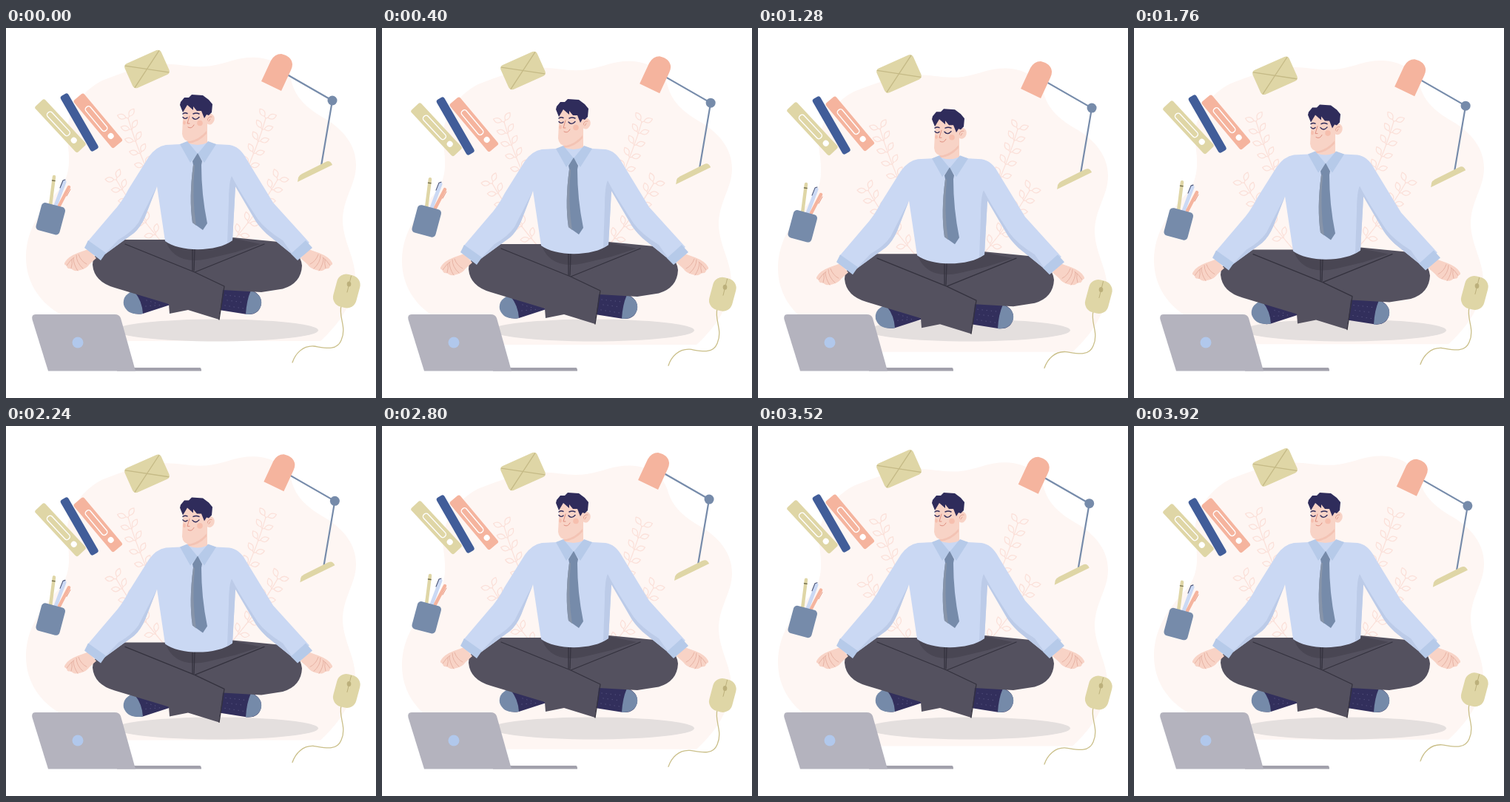
An HTML page for the animation above (4000 ms loop, 500 px wide and 500 px high).

```html
<!DOCTYPE html>
<html lang="en">
<head>
<meta charset="utf-8">
<title>Office meditation</title>
<style>
html, body { margin: 0; width: 100%; height: 100%; overflow: hidden; background: #fff; }
svg { display: block; width: 100vw; height: 100vh; }
.line { fill: none; stroke-linecap: round; stroke-linejoin: round; }
</style>
</head>
<body>
<svg viewBox="0 0 500 500" xmlns="http://www.w3.org/2000/svg">
  <defs>
    <g id="hand">
      <path fill="#f8d3c6" d="M111 299L97 304Q84 309 80 316Q77 320 82 321Q82 326 88 325Q92 330 101 327Q109 325 113 319L122 311Z"/>
      <path class="line" stroke="#e3aa9b" stroke-width=".8" d="M82 321Q87 313 92 310M88 325Q90 318 89 313M97 328Q91 319 91 311M104 325Q95 317 95 307M109 319Q101 315 98 306"/>
    </g>
    <g id="label" class="line" stroke="#fff" stroke-width="1.4">
      <rect x="-24" y="-4" width="41" height="8" rx="3.5"/>
      <circle cx="27" r="4" fill="#fff" stroke="none"/>
    </g>
  </defs>

  <path id="blob" fill="#fef6f3" d="M473 185C473 212 455 230 455 261C456 290 472 310 472 338C470 372 450 400 425 423H150C118 413 95 396 72 386C45 370 27 343 27 310C27 270 50 242 74 216C91 192 84 165 82 143C83 112 103 85 130 71C156 61 184 50 208 49C232 47 252 55 278 51C301 47 316 38 340 40C363 42 380 54 386 73C392 96 409 110 432 123C458 139 473 160 473 185Z"/>
  <g id="plants" class="line" stroke="#fbe0d9" stroke-width="1.2"></g>
  <ellipse cx="285" cy="408.5" rx="137" ry="15" fill="#e4dfde"/>

  <g id="mail">
    <g transform="translate(190.5 55.5) rotate(-24)">
      <rect x="-27" y="-18" width="54" height="36" rx="5" fill="#dfd6a6"/>
      <path class="line" stroke="#c5ba86" stroke-width="1.3" d="M-25-16L25 16M-25 16L25-16"/>
    </g>
  </g>

  <g id="binders">
    <g transform="translate(73.3 132) rotate(47)">
      <rect x="-42" y="-9" width="84.5" height="18" rx="3" fill="#dfd6a6"/><use href="#label"/>
    </g>
    <g transform="translate(124.3 125.3) rotate(50)">
      <rect x="-42" y="-9" width="84" height="18" rx="3" fill="#f5b49e"/><use href="#label"/>
    </g>
    <rect x="-43" y="-6" width="86" height="12" rx="3.5" fill="#415d99" transform="translate(99.2 127.5) rotate(60)"/>
  </g>

  <g id="cup">
    <path class="line" stroke="#dfd6a6" stroke-width="4.5" d="M60 240L65 201"/>
    <path class="line" stroke="#75704f" stroke-width="1.5" d="M62.5 206L66 206.5"/>
    <path class="line" stroke="#cbd9f4" stroke-width="5" d="M67 240L79 208"/>
    <path class="line" stroke="#4a5478" stroke-width="1.1" d="M73 216L77 206L80 205"/>
    <path class="line" stroke="#f5b49e" stroke-width="4.5" d="M72 240L85 215"/>
    <path class="line" stroke="#e69780" stroke-width="1" d="M82 227L87 218"/>
    <rect x="-16.5" y="-19" width="33" height="38.5" rx="5" fill="#768baa" transform="translate(60.3 257.5) rotate(15)"/>
  </g>

  <g id="lamp">
    <path class="line" stroke="#768baa" stroke-width="2.2" d="M380 63L441 98L426 186"/>
    <circle cx="441" cy="98" r="6.5" fill="#768baa"/>
    <path fill="#f5b49e" d="M345 72L358 44Q363 35 372 35Q386 38 387 49Q387 53 385 57L372 85Z"/>
    <path fill="#dfd6a6" d="M394 208L395 202Q396 199 400 197L432 181Q438 178 441 185Z"/>
  </g>

  <g id="mouse">
    <path class="line" stroke="#cabf89" stroke-width="1.3" d="M453 375C449 391 461 404 453 422C447 437 430 432 416 430C401 429 391 440 387 452"/>
    <rect x="-16" y="-22.5" width="32" height="45" rx="13" fill="#dfd6a6" transform="translate(460.3 355.5) rotate(15)"/>
    <path class="line" stroke="#bcb07b" stroke-width="1" d="M466.5 335L461 357"/>
    <ellipse cx="463.500" cy="346" rx="2.8" ry="3.5" fill="#bcb07b"/>
  </g>

  <g id="man">
    <path fill="#322f5c" d="M172 357Q160 363 161 375Q167 389 185 386L222 374L200 360Z"/>
    <path fill="#758aa9" d="M170 356Q157 362 159 374Q164 389 185 386Q184 369 174 357Z"/>
    <path fill="#322f5c" d="M290 353L331 354Q346 360 345 373Q342 388 326 387L288 381Z"/>
    <path fill="#758aa9" d="M331 354.5Q347 361 345 374Q341 388 324 387Q325 368 331 354.5Z"/>
    <path class="line" stroke="#6f6c98" stroke-width=".9" stroke-dasharray=".1 6" d="M297 361L324 364M299 368L322 371M296 375L321 379M190 368L206 373M189 376L212 374"/>
    <path fill="#54515f" d="M216 286L157 286Q117 298 117 320Q119 343 147 351L220 373L221 386L246 381L288 394L293 354L345 357L374 352.500Q399 345 400 321Q398 300 368 289L306 283Z"/>
    <path fill="#494653" d="M216 288Q222 306 240 312Q254 316 272 312L310 303L344 292L306 284Z"/>
    <path class="line" stroke="#34323e" stroke-width="1.3" d="M161 292L255 330L295 349L288 394M255 330L349 292M252 298V328M255 298L254 328"/>
    <use href="#hand"/>
    <use href="#hand" transform="translate(520) scale(-1 1)"/>
    <path fill="#cad8f3" d="M236 157L216 158Q203 160 193 174L166 217Q157 235 144 249L110 289L132 307L173 277Q182 269 188 255L204 214L215 288C234 303 286 303 306 287L310 214L338 262Q345 272 355 280L388 307L410 290L361 236L325 177Q316 160 302 158L284 157L259 152Z"/>
    <path fill="#bccbe8" d="M204 214L179 263Q170 276 152 286L132 307L173 277Q182 269 188 255Z"/>
    <path fill="#bccbe8" d="M299 291L301 235Q301 208 305 200Q312 215 340 258Q350 272 374 287L388 307L352 278Q342 268 337 260L310 214L306 287Z"/>
    <path fill="#b6cae9" d="M111 287L135 304L128 314L106 297ZM405 287L385 305L394 314L414 297Z"/>

    <path fill="#f8d3c6" d="M245 140V155Q259 161 272 155V128Z"/>
    <path fill="#f3c3b4" d="M246 153Q261 151 271 139V143Q260 155 246 156Z"/>
    <path fill="#b6cae9" d="M245 153L235 157L249 182L259 170ZM273 153L284 157L268 182L259 170Z"/>
    <path fill="#768baa" d="M259 169L252 180L253 185Q247 230 252 263L266 273L272 264Q264 225 264 185L265 180Z"/>
    <path fill="#8794a9" d="M253 185Q247 230 252 263L257 267Q251 230 255 185Z"/>

    <ellipse cx="275.500" cy="123" rx="6.200" ry="7.500" fill="#f8d3c6" transform="rotate(15 275 123)"/>
    <path class="line" stroke="#e3a292" stroke-width="1" d="M272 125Q273 119 278 120M274 126L276 123"/>
    <path fill="#f8d3c6" d="M240 104L238 143Q239 153 249 153Q262 150 271 138L273 106Z"/>
    <circle cx="262" cy="128.500" r="3.800" fill="#f6bfae"/>
    <ellipse cx="241" cy="128" rx="1.800" ry="2.800" fill="#f6bfae"/>
    <path fill="#2f2c5b" d="M235 104L236 100L241 94L247 94L251 90L266 91L274 97L279 103L278 114L274 118L271 117L268 122L264 112L258 112L253 106L253 111L245 104L239 114Z"/>
    <path class="line" stroke="#2f2c5b" stroke-width="1.500" d="M239 116Q242 114 245 115.500M253 116Q257 114 261 116"/>
    <path class="line" stroke="#2f2c5b" stroke-width="1.400" d="M239 120.500Q242 124 245 121M252 121Q256 126 261 120.500"/>
    <path class="line" stroke="#df8f80" stroke-width="1" d="M248 119L245 129L248 129M246 134Q251 137 254 131"/>
  </g>

  <path fill="#a2a1ac" d="M150 459H262Q264 459 264 463.5H150Z"/>
  <path fill="#b4b3be" d="M40 387H147Q153 387 155 392L175 463.5H57L35.5 394Q34 387 40 387Z"/>
  <circle cx="97" cy="425" r="7.5" fill="#b1c8ec"/>
</svg>
<script>
const LOOP = 4000, STEP = 80, SWING = LOOP / 1.5;
const el = id => document.getElementById(id);

// A stem along a quadratic curve with pairs of outlined leaves
function branch(x0, y0, cx, cy, x1, y1, pairs) {
  let out = `<path d="M${x0} ${y0}Q${cx} ${cy} ${x1} ${y1}"/>`;
  for (let i = 0; i < pairs; i++) {
    const t = 1 - i / pairs, u = 1 - t;
    const x = u * u * x0 + 2 * u * t * cx + t * t * x1;
    const y = u * u * y0 + 2 * u * t * cy + t * t * y1;
    const dir = Math.atan2(u * (cy - y0) + t * (y1 - cy), u * (cx - x0) + t * (x1 - cx)) * 180 / Math.PI;
    for (const turn of [-58, 48]) {
      out += `<path transform="translate(${x} ${y}) rotate(${dir + turn})" d="M0 0H3Q9-7 15 0Q9 6 3 0"/>`;
    }
  }
  return out;
}

const side = branch(196, 204, 176, 160, 165, 122, 5) + branch(216, 296, 172, 245, 149, 205, 6);
el('plants').innerHTML = `<g>${side}</g><g transform="translate(516) scale(-1 1)">${side}</g>`;

// Steady there-and-back swing from 0 to 1
function wave(t, period, shift = 0) {
  const p = ((t / period + shift) % 1 + 1) % 1;
  return 1 - Math.abs(2 * p - 1);
}

function move(id, x, y) {
  el(id).setAttribute('transform', `translate(${x.toFixed(2)} ${y.toFixed(2)})`);
}

function draw(time) {
  const t = Math.floor(time % LOOP / STEP) * STEP;
  const swing = wave(t, SWING);
  // The backdrop rests briefly at the top of its path
  const drift = Math.max(0, wave(t, LOOP / 2, -0.03) * 1.12 - 0.12);
  move('blob', 0, 19.5 * drift);
  move('plants', 0, 19.5 * drift);
  move('mouse', 0, 10.5 * wave(t, LOOP / 2));
  move('lamp', 10.5 * swing, 10.5 * swing);
  move('cup', 0, 10.5 * swing);
  move('binders', 0, 10 * wave(t, LOOP / 2.5));
  move('mail', 0, 10 * wave(t, LOOP));
  move('man', 0, t < SWING ? 20 * swing : 0);
}

const start = performance.now();
function tick() {
  draw(performance.now() - start);
  requestAnimationFrame(tick);
}
tick();
</script>
</body>
</html>
```
